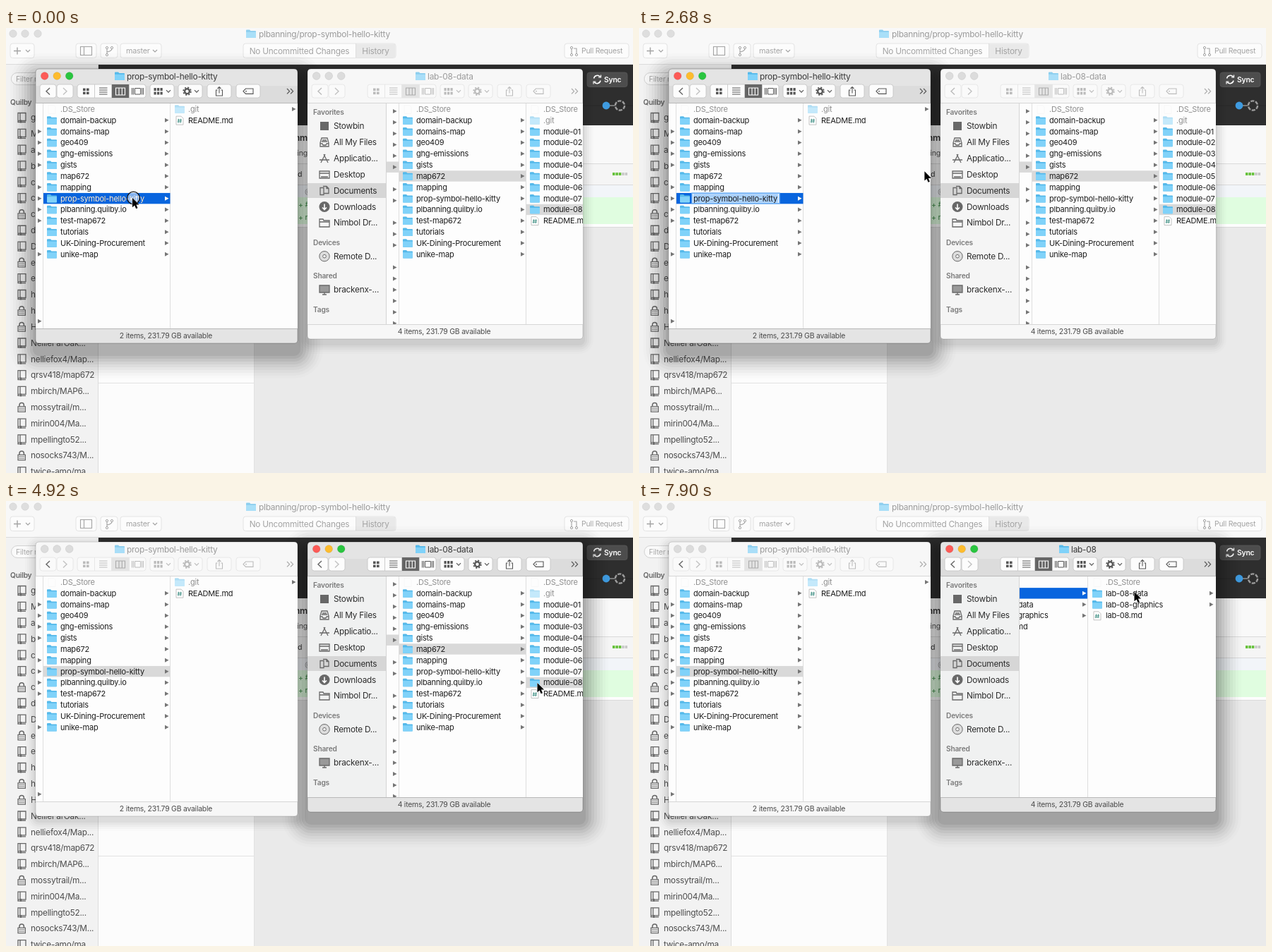
An HTML page that plays this animation: 888x631 px, repeating every 8 s.

```html
<!DOCTYPE html>
<html lang="en">
<head>
<meta charset="utf-8">
<title>Two file windows</title>
<style>
html, body { margin: 0; width: 100%; height: 100%; overflow: hidden; background: #eaeaea; }
svg { display: block; width: 888px; height: 631px; }
text { font-family: Inter, "Open Sans", sans-serif; letter-spacing: -.02em; white-space: pre; }
</style>
</head>
<body>
<svg viewBox="0 0 888 631" xmlns="http://www.w3.org/2000/svg">
  <defs>
    <g id="folder">
      <path d="M0 1.5Q0 .5 1 .5H5L6.5 2H13Q14 2 14 3V11Q14 12 13 12H1Q0 12 0 11Z" fill="#55b9ea"/>
      <path d="M0 3.7H14V11Q14 12 13 12H1Q0 12 0 11Z" fill="#80d2f9"/>
    </g>
    <g id="doc">
      <path d="M2 .5H9L12 3.5V12.5H2Z" fill="#fff" stroke="#b4b4b4" stroke-width=".8"/>
      <path d="M5.7 4 5 10M8.7 4 8 10M4 6H10M3.7 8.2H9.7" stroke="#3f8f84" stroke-width=".9"/>
    </g>
    <path id="blank" d="M2 .5H9L12 3.5V12.5H2Z" fill="#fff" stroke="#ececec" stroke-width=".8"/>
    <clipPath id="cols"><rect x="539" y="107" width="278" height="313"/></clipPath>
  </defs>
  <g id="scene"></g>
  <g id="pointer">
    <circle id="ring" cx="1.5" r="8.8" fill="#fff" fill-opacity=".5" stroke="#111" stroke-width="1.3"/>
    <path d="M0 0V13.2L3.1 10.4 5.2 15.3 7.5 14.3 5.4 9.6H9.6Z" fill="#000" stroke="#fff" stroke-width="1" paint-order="stroke"/>
  </g>
</svg>
<script>
const $ = id => document.getElementById(id);
const ROW = 15.83;
const rowY = i => 115 + i * ROW;

const rect = (x, y, w, h, fill, more = '') =>
  `<rect x="${x}" y="${y}" width="${w}" height="${h}" fill="${fill}" ${more}/>`;
const dot = (x, y, r, fill, more = '') => `<circle cx="${x}" cy="${y}" r="${r}" fill="${fill}" ${more}/>`;
const line = (d, c, w = 1, fill = 'none') =>
  `<path d="${d}" fill="${fill}" stroke="${c}" stroke-width="${w}"/>`;
const text = (x, y, s, size = 11, fill = '#1c1c1c', more = '') =>
  `<text x="${x}" y="${y + size * .36}" font-size="${size}" fill="${fill}" ${more}>${s}</text>`;
const use = (id, x, y, o = 1) => `<use href="#${id}" x="${x}" y="${y}" opacity="${o}"/>`;
const button = (x, y, w, h, fill, c) => rect(x, y, w, h, fill, `rx="3.5" stroke="${c}" stroke-width=".8"`);
const tri = (x, y, c = '#757575') => `<path d="M${x} ${y - 3}V${y + 3}L${x + 5.5} ${y}Z" fill="${c}"/>`;
const vee = (x, y, c) => line(`M${x - 3} ${y - 1.5}l3 3 3-3`, c, 1.2);
const mid = 'text-anchor="middle"';
const bold = 'font-weight="600"';

// ---- application behind the windows ----
const repos = ['g', 'Ma', 'a', 'b', 'c', 'c', 'c', 'd', 'D', 'e', 'e', 'h', 'h', 'H',
  'NellieFarOak...', 'nelliefox4/Map...', 'qrsv418/map672', 'mbirch/MAP6...', 'mossytrail/m...',
  'mirin004/Ma...', 'mpellingto52...', 'nosocks743/M...', 'twice-amo/ma...'];
const locked = [6, 9, 12, 13, 18, 21];

function repo(name, i) {
  const y = 127 + i * 22.82, c = '#666';
  const icon = locked.includes(i)
    ? line(`M19 ${y - 1}V${y - 3}a3.2 3.2 0 0 1 6.4 0V${y - 1}`, c, 1.5) +
      rect(17, y - 1, 10.4, 7.5, '#f2f2f2', `stroke="${c}" stroke-width="1.2"`) +
      line(`M18 ${y + 1.5}h8.5M18 ${y + 4}h8.5`, c, .8)
    : line(`M17 ${y - 6.5}H28V${y + 4.5}H17ZM20 ${y - 6}V${y + 4}M17 ${y + 4}V${y + 6.5}H28`, c, 1.3) +
      line(`M21 ${y + 3.5}v4`, c, 2);
  return icon + text(35, y, name, 11.8, '#4c4c4c');
}

function backdrop() {
  const g = '#a3a3a3', edge = '#dedede';
  let s = rect(0, 0, 888, 631, '#eaeaea') + rect(131, 138, 220, 493, '#fcfcfc') +
    line('M351.5 138V631M131 503.5H351', '#e2e2e2');
  s += rect(0, 52, 131, 579, '#f2f2f2') + line('M130.5 52V631', '#dcdcdc') +
    rect(7.5, 63.5, 118, 17, '#fafafa', 'rx="8.5" stroke="#d2d2d2"') + text(14, 72, 'Filter repositories', 10.4, '#aaa') +
    text(6, 105, 'Quilby', 10.2, '#666', bold) + repos.map(repo).join('');
  s += rect(0, 0, 888, 52, '#f8f8f8') + line('M0 51.5H888', '#dcdcdc');
  s += [10, 27, 45].map(x => dot(x, 8, 5.2, '#dedede', 'stroke="#d0d0d0" stroke-width=".6"')).join('');
  s += use('folder', 340, 2, .65) + text(358, 8.5, 'plbanning/prop-symbol-hello-kitty', 11.9, '#9b9b9b');
  for (const [x, w] of [[6, 34], [99, 29], [134, 24], [162, 58], [336, 216], [791, 91]])
    s += button(x, 22, w, 20.5, '#fcfcfc', edge);
  s += rect(495, 22.4, 56.6, 19.7, '#e9e9e9') + line('M495.5 22V42', edge);
  s += line('M11 32.5H21M16 27.5V37.5', g, 1.4) + vee(31, 32.5, g) + vee(211, 32.5, g);
  s += line('M105.5 26.5H121.5V38.5H105.5ZM110.5 27V38', g, 1.1);
  s += line('M143 29V37M150 29Q150 33 143 34', g, 1.1) +
    [[143, 28], [150, 28], [143, 38]].map(p => dot(...p, 1.6, '#fcfcfc', `stroke="${g}"`)).join('');
  s += text(170, 32.5, 'master', 10.8, g) + text(415.5, 32.5, 'No Uncommitted Changes', 11.8, g, mid) +
    text(523.5, 32.5, 'History', 11.8, g, mid) + text(815, 32.5, 'Pull Request', 10.4, g);
  s += line('M801 29V37M804 29H808V37', g, 1.1) +
    [[801, 28], [801, 38], [808, 38]].map(p => dot(...p, 1.6, '#fcfcfc', `stroke="${g}"`)).join('');
  // dark strip and diff pane
  s += rect(131, 52, 757, 86, '#2e2e2e') + rect(352, 138, 536, 55, '#f9f9f9') + rect(352, 193, 536, 29, '#f5f5f5') +
    rect(352, 222, 536, 18, '#f2f5f9') + rect(352, 240, 536, 38, '#e0fde0') + rect(352, 278, 536, 4, '#fdfdfd') +
    line('M352 192.5H888M352 222.5H888M352 282.5H888', '#dadada');
  s += text(427, 155, 'Comm', 12.5, '#333', bold + ' text-anchor="end"') + text(427, 177, 'plbanning', 10.6, '#555', 'text-anchor="end"') +
    text(413, 207, 'd', 10.6, '#333') + text(423, 231, '@', 10, '#999') +
    text(414, 250, '+ #', 10.4, '#3f8f4a') + text(414, 268, '+ r', 10.4, '#3f8f4a');
  for (let i = 0; i < 5; i++) s += rect(859 + i * 4.4, 205, 3.5, 4, i < 3 ? '#67c23c' : '#c9c9c9');
  s += button(823, 63, 57, 20.5, '#4d4d4d', '#5a5a5a') + text(847, 73, 'Sync', 10.4, '#fff', bold) +
    line('M832.5 71.5a5 5 0 0 1 9-2M842 74.5a5 5 0 0 1-9 2', '#fff', 1.5) +
    line('M842.5 66.5v3.5h-3.5M832 79.5V76h3.5', '#fff', 1.2);
  s += line('M817 110H888', '#262626') + line('M855 110H862', '#8a8a8a', 1.6) + dot(850, 110, 5.4, '#3f9be0') +
    dot(869.5, 110, 6.6, '#2e2e2e', 'stroke="#9c9c9c" stroke-width="2.4" stroke-dasharray="5.2 1.7"');
  return s;
}

// ---- windows ----
function shadow(x, h, w, on) {
  const n = on ? 9 : 5, step = on ? 4 : 3, dy = on ? 14 : 6;
  let s = '';
  for (let i = n; i > 0; i--) {
    const e = i * step;
    s += rect(x - e, 58 + dy - e, w + 2 * e, h + 2 * e, '#000', `rx="${e + 5}" opacity="${.012 + .007 * (n - i)}"`);
  }
  return s;
}

function toolbar(nav, dx, more, on, navOn) {
  const c = on ? '#565656' : '#bcbcbc', fill = on ? '#fcfcfc' : '#fafafa', edge = on ? '#c2c2c2' : '#e3e3e3';
  const X = x => x + dx;
  let s = button(nav, 80, 23, 19, fill, edge) + button(nav + 24, 80, 23, 19, fill, edge) +
    line(`M${nav + 14} 85l-5 4.7 5 4.7`, navOn ? '#666' : '#bbb', 1.4) + line(`M${nav + 33} 85l5 4.7-5 4.7`, '#c2c2c2', 1.4);
  s += button(X(101), 80, 97, 19, fill, edge) + rect(X(150), 80, 24, 19, on ? '#666' : '#e4e4e4') +
    line(`M${X(125.5)} 80V99M${X(149.5)} 80V99M${X(174.5)} 80V99`, edge, .8);
  for (const x of [204, 244, 285, 326]) s += button(X(x), 80, 34, 19, fill, edge);
  for (let i = 0; i < 4; i++) s += rect(X(109) + i % 2 * 5, 85.5 + (i >> 1) * 5, 3.6, 3.6, c);
  s += line([0, 1, 2, 3].map(i => `M${X(132)} ${85 + i * 3}h11.5`).join(''), c, 1.1);
  s += line(`M${X(155.5)} 85H${X(168.5)}V95H${X(155.5)}ZM${X(160)} 85V95M${X(164.3)} 85V95`, on ? '#fff' : '#aaa', 1.1);
  s += line(`M${X(182.5)} 85.5h8v8.5h-8ZM${X(178.5)} 85V94.5M${X(180.5)} 85V94.5M${X(192.5)} 85V94.5M${X(194.5)} 85V94.5`, c);
  for (let i = 0; i < 6; i++) s += rect(X(209.5) + i % 3 * 4.5, 85 + (i > 2) * 5.5, 3.2, 4, c);
  s += vee(X(230), 89.7, c) + vee(X(270), 89.7, c);
  s += dot(X(256.5), 89.7, 5.4, 'none', `stroke="${c}" stroke-width="1.6" stroke-dasharray="2.2 2.04"`) +
    dot(X(256.5), 89.7, 3.4, 'none', `stroke="${c}" stroke-width="2.4"`);
  s += line(`M${X(299.5)} 88H${X(297.5)}V96H${X(306.5)}V88H${X(304.5)}M${X(302)} 92.5V83.5M${X(299.5)} 86l2.5-2.5 2.5 2.5`, c, 1.1);
  s += line(`M${X(336)} 89.7l3.5-3.7H${X(350)}v7.4H${X(339.5)}Z`, c, 1.1) + dot(X(340), 89.7, .9, c);
  return s + line(`M${more - 5} 86l3.6 3.7-3.6 3.7M${more} 86l3.6 3.7-3.6 3.7`, on ? '#555' : '#aaa', 1.2);
}

function frame(x, w, h, on, titleX, title, status) {
  const end = 58 + h, foot = end - 20.5;
  const lights = on ? ['#fc5b57', '#fdbc2e', '#2ac540'] : ['#dcdcdc', '#dcdcdc', '#dcdcdc'];
  let s = `<path d="M${x} ${end - 4}V63q0-5 5-5H${x + w - 5}q5 0 5 5V${end - 4}q0 4-4 4H${x + 4}q-4 0-4-4Z" fill="${on ? '#e4e4e4' : '#f7f7f7'}" stroke="#000" stroke-opacity="${on ? .3 : .2}" stroke-width=".8"/>`;
  if (on) s += rect(x, 82, w, 24, '#000', 'opacity=".035"');
  s += rect(x, 106, w, foot - 106, '#fdfdfd') +
    line(`M${x} 106.5H${x + w}M${x} ${foot}H${x + w}`, on ? '#b9b9b9' : '#d6d6d6');
  s += lights.map((c, i) => dot(x + 12.7 + i * 17.5, 68, 5.4, c, 'stroke="#000" stroke-opacity=".1" stroke-width=".7"')).join('');
  return s + use('folder', titleX - 17, 62, on ? 1 : .65) + text(titleX, 68.5, title, 11.9, on ? '#3a3a3a' : '#9b9b9b') +
    text(x === 42 ? 226.5 : 620.5, end - 10.5, status + ' items, 231.79 GB available', 10.4, '#4a4a4a', mid);
}

function item(x, i, name, ink) {
  const dim = name[0] === '.', y = rowY(i);
  const icon = name === '.DS_Store' ? 'blank' : /\.md?$/.test(name) ? 'doc' : 'folder';
  return use(icon, x, y - 6.2, dim ? .45 : 1) + text(x + 19, y, name, 11, ink || (dim ? '#8f8f8f' : '#1c1c1c'));
}
const column = (x, names) => names.map((n, i) => item(x, i, n)).join('');
const arrows = (x, rows, y0 = 115, c) => rows.map(i => tri(x, y0 + i * ROW, c)).join('');
const bar = (x, i, w, c) => rect(x, rowY(i) - 7.7, w, 15.4, c);
const span = (a, b) => Array.from({ length: b - a + 1 }, (_, i) => a + i);

const BLUE = '#0865de', GREY = '#d9d9d9';
const docs = ['.DS_Store', 'domain-backup', 'domains-map', 'geo409', 'ghg-emissions', 'gists', 'map672', 'mapping',
  'prop-symbol-hello-kitty', 'plbanning.quilby.io', 'test-map672', 'tutorials', 'UK-Dining-Procurement', 'unike-map'];

function leftWindow(on, editing) {
  let s = frame(42, 371, 389, on, 171, docs[8], 2) + toolbar(48, 0, 403, on, true) +
    line('M52.5 107V426M232.5 107V426', '#dedede') + bar(53, 8, 179.5, on ? BLUE : GREY);
  s += column(58, docs) + arrows(225, span(1, 13)) + arrows(45, [2, 3, 4, 5, 7, 8, 9, 10, 13, 19]);
  if (on) {
    s += tri(225, rowY(8), '#fff');
    if (editing) s += rect(75, 234.2, 124, 14.6, '#fff', 'stroke="#6fb0f5" stroke-width="1.6"') + rect(77, 235.2, 120, 12.6, '#a9d0fb');
    s += text(77, rowY(8), docs[8], 11, editing ? '#1c1c1c' : '#fff');
  }
  return s + column(239, ['.git', 'README.md']) + tri(405, 115);
}

// sidebar glyphs, centred on 0,0
const glyphs = {
  files: 'M-6 1L-4-6H4L6 1V6H-6ZM-6 2H-3L-2 4H2L3 2H6M-3-3H3M-4-1H4',
  apps: 'M-5 6L1-6M5 6L-1-6M-7 2H7',
  desk: 'M-7-5H7V5H-7ZM-7-2H7M-5 3H5',
  docs: 'M-6-4H-1V6H-6ZM-2-6H3L6-3V4H-1M3-6V-3H6',
  folder: 'M-7-5H-2L-1-3H7V6H-7ZM-7-1H7',
  screen: 'M-7-6H7V4H-7ZM-3 7H3M0 4V7'
};
const places = [['Favorites', 119], ['Stowbin', 139, 'plain'], ['All My Files', 162, 'files'], ['Applicatio...', 185, 'apps'],
  ['Desktop', 208, 'desk'], ['Documents', 230.5, 'docs'], ['Downloads', 253.5, 'down'], ['Nimbol Dr...', 276, 'folder'],
  ['Devices', 304], ['Remote D...', 323.7, 'disc'], ['Shared', 351.5], ['brackenx-...', 371, 'screen'], ['Tags', 399]];

function place([name, y, icon]) {
  if (!icon) return text(435, y, name, 10.2, '#7a7a7a', bold);
  const c = '#686868';
  const art = icon === 'plain' ? rect(-6, -6, 12, 12, c)
    : icon === 'down' ? dot(0, 0, 7.5, c) + line('M0-4V4M-3 1L0 4 3 1', '#fff', 1.6)
    : icon === 'disc' ? dot(0, 0, 7.2, '#ddd', `stroke="${c}"`) + dot(0, 0, 2.3, '#fff', `stroke="${c}"`)
    : line(glyphs[icon], c, 1.3, icon === 'screen' ? '#999' : 'none');
  return `<g transform="translate(451 ${y})">${art}</g>` + text(464, y, name, 11.8, '#2c2c2c');
}

const views = [
  { title: 'lab-08-data', x: 597, count: 4, body: () =>
    line('M556.5 107V420M736.5 107V420', '#dedede') + rect(539, 189.5, 17, 15.4, GREY) +
    arrows(548, span(0, 19).filter(i => ![6, 9, 13].includes(i)), 118) +
    bar(557, 6, 179, GREY) + column(562, docs) + arrows(729, span(1, 13)) + bar(737, 9, 80, GREY) +
    column(742, ['.DS_Store', '.git', ...span(1, 8).map(i => 'module-0' + i), 'README.md']) },
  { title: 'module-08', x: 600, count: 5, body: () =>
    bar(539, 9, 96.5, BLUE) + arrows(628, span(1, 8)) + tri(628, rowY(9), '#fff') +
    text(543, rowY(10), 'README.md', 11, '#1c1c1c', 'text-anchor="end"') + line('M635.5 107V420', '#dedede') +
    column(642, ['.DS_Store', 'lab-08', 'lesson-08-data', 'lesson-08-graphics', 'lesson-08.md']) + arrows(808, [1, 2, 3]) },
  { title: 'lab-08', x: 612, count: 4, body: () =>
    bar(539, 1, 96.5, BLUE) + tri(628, rowY(1), '#fff') + arrows(628, [2, 3]) +
    [['data', 558.5], ['graphics', 579.5], ['md', 550.5]].map(([n, x], i) =>
      text(x, rowY(i + 2), 'lesson-08' + (i < 2 ? '-' : '.') + n, 11, '#1c1c1c', 'text-anchor="end"')).join('') +
    line('M635.5 107V420', '#dedede') +
    column(642, ['.DS_Store', 'lab-08-data', 'lab-08-graphics', 'lab-08.md']) + arrows(808, [1, 2]) }
];

function rightWindow(on, view, navOn) {
  const v = views[view];
  return frame(427, 390, 383, on, v.x, v.title, v.count) + toolbar(433, 411, 806, on, navOn) +
    rect(427, 107, 111.5, 313, on ? '#f0f1f1' : '#f5f5f5') + rect(427, 220, 111.5, 21, '#d6d6d6') +
    line('M538.5 107V420', '#d4d4d4') + places.map(place).join('') +
    `<g clip-path="url(#cols)">${v.body()}</g>`;
}

// ---- time ----
const LOOP = 8000;
const clicks = [0, 3570, 5370, 7160];
// start, end, number of steps, way points
const moves = [
  [300, 1190, 7, [[179, 241], [274, 222], [262, 165], [264, 119], [290, 138]]],
  [1330, 1480, 2, [[290, 138], [298.5, 201]]],
  [2380, 3270, 7, [[298.5, 201], [567.5, 207]]],
  [4020, 4920, 7, [[567.5, 207], [660, 232], [738, 251], [757, 257], [752.5, 258]]],
  [6120, 6570, 4, [[752.5, 258], [691.5, 127]]],
  [7900, 7900, 1, [[691.5, 127], [701.5, 129]]]
];

function pointerAt(t) {
  let pos = moves[0][3][0];
  for (const [a, b, n, pts] of moves) {
    if (t < a) break;
    const k = n > 1 ? Math.min(n - 1, Math.floor((t - a) / (b - a) * (n - 1) + .08)) : 0;
    const u = (k + 1) / n, f = u * u * (3 - 2 * u) * (pts.length - 1);
    const i = Math.min(pts.length - 2, Math.floor(f)), p = pts[i], q = pts[i + 1];
    pos = p.map((v, j) => v + (q[j] - v) * (f - i));
  }
  return pos;
}

const back = backdrop();
let shown = '';
function render(t) {
  const right = t >= 3720, editing = t >= 740, nav = t >= 3570;
  const view = t < 5520 ? 0 : t < 7310 ? 1 : 2;
  const key = [right, editing, nav, view].join();
  if (key !== shown) {
    shown = key;
    $('scene').innerHTML = back + shadow(42, 389, 371, !right) + shadow(427, 383, 390, right) +
      leftWindow(!right, editing) + rightWindow(right, view, nav);
  }
  $('pointer').setAttribute('transform', `translate(${pointerAt(t).join(' ')})`);
  $('ring').setAttribute('visibility', clicks.some(c => t >= c && t < c + 150) ? 'visible' : 'hidden');
}

const start = performance.now();
function tick() {
  render((performance.now() - start) % LOOP);
  requestAnimationFrame(tick);
}
tick();
</script>
</body>
</html>
```
